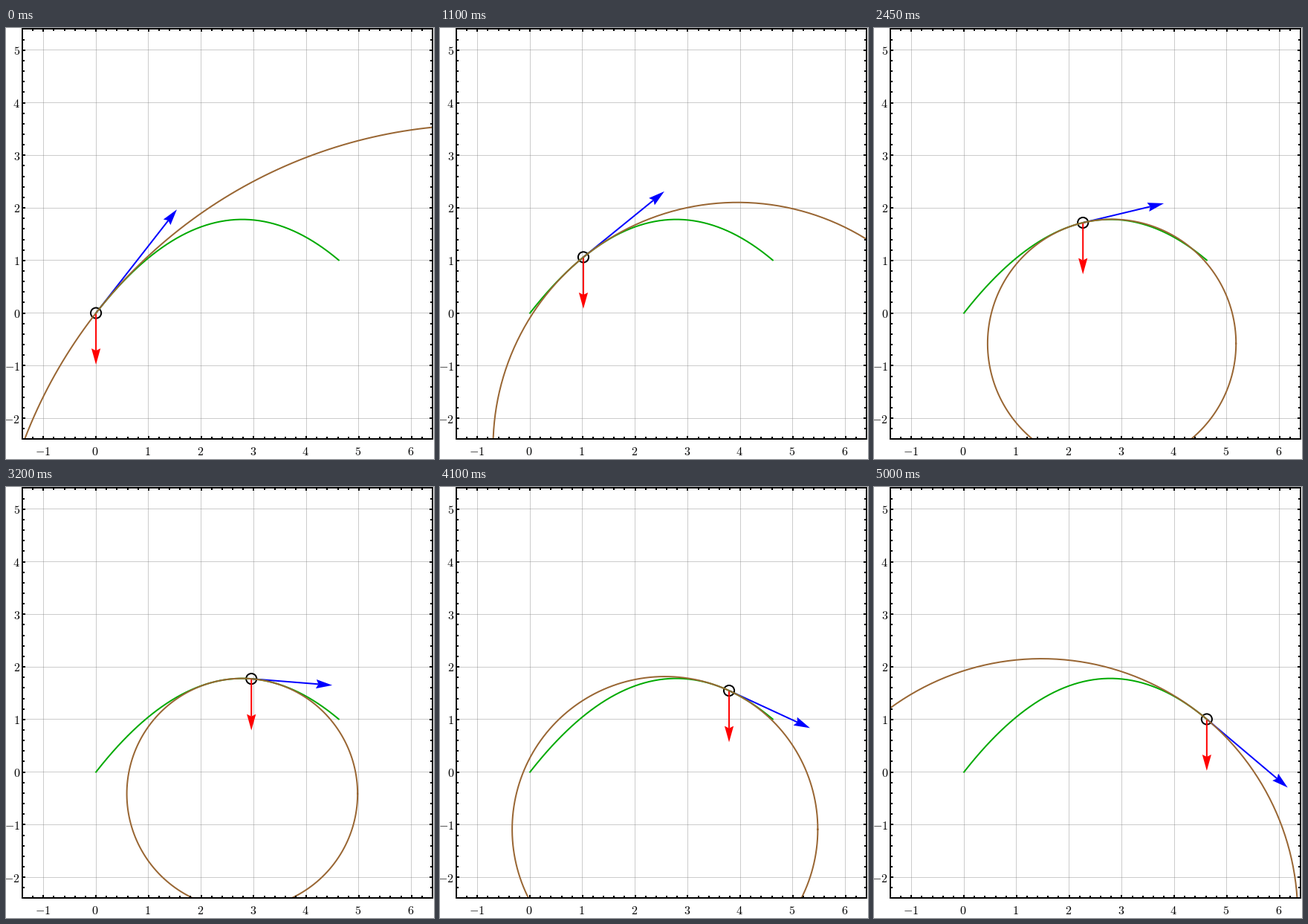
Animation of 576x580 px, one loop 5050 ms. Source, as a matplotlib script:

```python
import numpy as np
import matplotlib.pyplot as plt
from matplotlib.animation import FuncAnimation
from matplotlib.patches import Circle, Polygon, Rectangle

W, H, DPI = 576, 580, 64
PT = 72 / DPI                        # points per pixel
FRAMES, INTERVAL = 101, 50

LEFT, RIGHT, TOP, BOTTOM = 22, 574, 1, 553
UNIT = (RIGHT - LEFT) / 7.8          # the x range is -1.4 to 6.4
X0, Y0 = LEFT + 1.4 * UNIT, 383.6    # pixel position of the origin

G = 9.81
ANGLE = np.radians(52)
V0 = 7.5 * np.array([np.cos(ANGLE), np.sin(ANGLE)])
GREEN, BROWN = "#00aa00", "#996633"

plt.rcParams["mathtext.fontset"] = "cm"
fig = plt.figure(figsize=(W / DPI, H / DPI), dpi=DPI, facecolor="white")
ax = fig.add_axes([0, 0, 1, 1])
ax.set_xlim(0, W)
ax.set_ylim(H, 0)
ax.axis("off")


def to_px(x, y):
    return np.array([X0 + UNIT * x, Y0 - UNIT * y])


def position(t):
    return V0[0] * t, V0[1] * t - G * t * t / 2


def velocity(t):
    return np.array([V0[0], V0[1] - G * t])


def stroke(xs, ys, color, width, z, **kw):
    return ax.plot(xs, ys, color=color, lw=width * PT, zorder=z, **kw)[0]


class Arrow:
    HEAD, NOTCH, HALF = 21.8, 18.8, 6.1

    def __init__(self, color, z):
        self.shaft = stroke([], [], color, 2, z, solid_capstyle="butt",
                            snap=False)
        self.head = Polygon(np.zeros((4, 2)), fc=color, lw=0, zorder=z)
        ax.add_patch(self.head)

    def place(self, start, end):
        d = (end - start) / np.hypot(*(end - start))
        side = np.array([-d[1], d[0]]) * self.HALF
        back, notch = end - d * self.HEAD, end - d * self.NOTCH
        self.shaft.set_data(*zip(start, notch))
        self.head.set_xy([end, back + side, notch, back - side])


def grid_line(xs, ys):
    stroke(xs, ys, "0.5", 1, 1, alpha=0.4, snap=False, solid_capstyle="butt")


def tick(xs, ys):
    stroke(xs, ys, "black", 2, 9, solid_capstyle="butt")


def draw_axes():
    for n in range(-1, 7):
        x = to_px(n, 0)[0]
        grid_line([np.floor(x) + 0.5] * 2, [TOP, BOTTOM])
        ax.text(x - 1, 575, f"${n}$", size=16 * PT, ha="center", va="baseline")
    for n in range(-2, 6):
        y = to_px(0, n)[1]
        grid_line([LEFT, RIGHT], [np.floor(y) + 0.5] * 2)
        ax.text(19, y + 6.4, f"${n}$", size=16 * PT, ha="right", va="baseline")

    for k in range(-12, 33):
        size = 4 if k % 5 == 0 else 3
        x, y = to_px(k / 5, k / 5)
        if LEFT < x < RIGHT:
            tick([x, x], [TOP, TOP + size])
            tick([x, x], [BOTTOM, BOTTOM - size])
        if TOP < y < BOTTOM:
            tick([LEFT, LEFT + size], [y, y])
            tick([RIGHT, RIGHT - size], [y, y])
    ax.add_patch(Rectangle((LEFT, TOP), RIGHT - LEFT, BOTTOM - TOP,
                           fill=False, ec="black", lw=2 * PT, zorder=10))


draw_axes()
stroke(*to_px(*position(np.linspace(0, 1, 200))), GREEN, 2, 6)

ball = Circle((0, 0), 0.1 * UNIT, fill=False, ec="black", lw=2 * PT, zorder=4)
ax.add_patch(ball)
speed_arrow = Arrow("blue", 3)
gravity_arrow = Arrow("red", 5)

osculating = stroke([], [], BROWN, 2, 7)
plot_area = Rectangle((LEFT, TOP), RIGHT - LEFT, BOTTOM - TOP,
                      transform=ax.transData)
osculating.set_clip_path(plot_area)
theta = np.linspace(0, 2 * np.pi, 400)


def update(i):
    t = i / (FRAMES - 1)
    x, y = position(t)
    v = velocity(t)
    here = to_px(x, y)
    ball.center = here
    speed_arrow.place(here, to_px(x + v[0] / 3, y + v[1] / 3))
    gravity_arrow.place(here, to_px(x, y - G / 10))

    speed = np.hypot(*v)
    radius = speed ** 3 / (G * v[0])
    cx = x + radius * v[1] / speed
    cy = y - radius * v[0] / speed
    osculating.set_data(*to_px(cx + radius * np.cos(theta),
                               cy + radius * np.sin(theta)))
    return ()


anim = FuncAnimation(fig, update, frames=FRAMES, interval=INTERVAL,
                     repeat=True, repeat_delay=0, blit=False)
plt.show()
```
